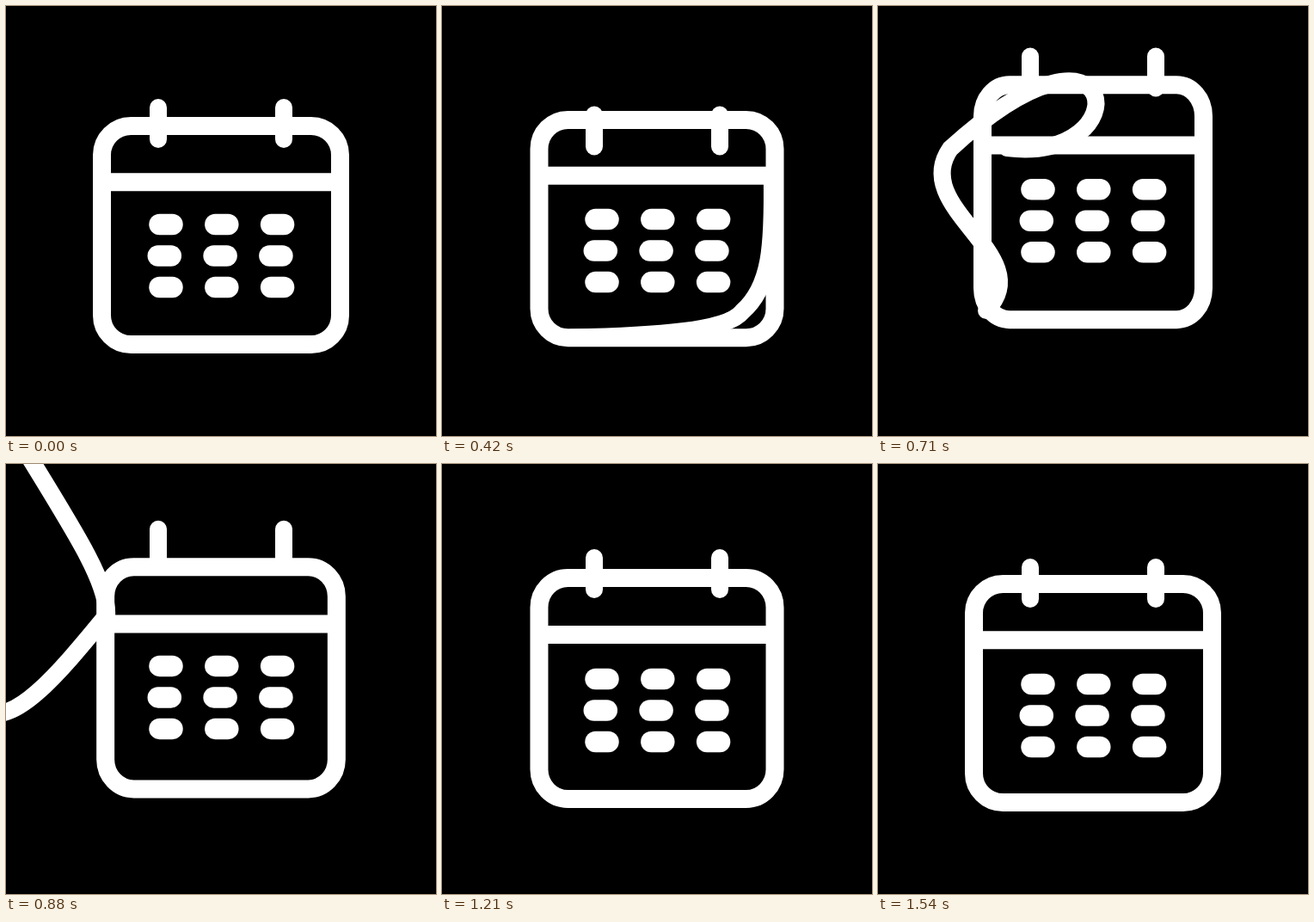
An HTML page with a canvas that plays this animation: 500x500 px, repeating every 1830 ms.

```html
<!DOCTYPE html>
<html lang="en">
<head>
<meta charset="utf-8">
<title>Calendar</title>
<style>
  html, body { margin: 0; height: 100%; overflow: hidden; background: #000; }
  canvas { display: block; width: 100vmin; height: 100vmin; }
</style>
</head>
<body>
<canvas id="stage" width="500" height="500"></canvas>
<script>
const ctx = document.getElementById('stage').getContext('2d');
const LOOP = 1830, FPS = 24;
const PEEL = 6, FOLD = 17, THROW = 21;

// The hop: crouch, leap, land, rebound, settle
const poses = [
  { at: 0, top: 129, bottom: 404, pin: 108, dots: 254 },
  { at: PEEL, top: 137, bottom: 404, pin: 130, dots: 261 },
  { at: 17.5, top: 81, bottom: 375, pin: 45, dots: 213 },
  { at: 25, top: 144, bottom: 405, pin: 128, dots: 262 },
  { at: 29, top: 122, bottom: 400, pin: 94, dots: 250 },
  { at: 36, top: 129, bottom: 404, pin: 110, dots: 256 }
];

// Two cubic curves: side edge, loose corner (fourth point), lower edge
const folded = [[150, 165], [305, 185], [288, -20], [84, 166], [36, 235], [188, 290], [126, 354]];
const thrown = [[117, 178], [121, 130], [60, 50], [-60, -150], [-100, 440], [5, 312], [117, 176]];

const mix = (a, b, u) => a + (b - a) * u;
const clamp01 = u => Math.max(0, Math.min(1, u));

function track(name, step) {
  const i = Math.max(1, poses.findIndex(pose => pose.at > step));
  if (step >= poses.at(-1).at) return poses.at(-1)[name];
  const a = poses[i - 1], b = poses[i];
  const u = clamp01((step - a.at) / (b.at - a.at));
  return mix(a[name], b[name], (1 - Math.cos(Math.PI * u)) / 2);
}

function bodyAt(step) {
  const top = track('top', step), bottom = track('bottom', step);
  const lift = 129 - top;
  return {
    top, bottom,
    left: 101 + lift * (lift > 0 ? 0.21 : 0.62),
    header: mix(top, bottom, 0.275),
    pin: track('pin', step - 1),
    dots: track('dots', step)
  };
}

function line(x1, y1, x2, y2, width) {
  ctx.lineWidth = width;
  ctx.beginPath();
  ctx.moveTo(x1, y1);
  ctx.lineTo(x2, y2);
  ctx.stroke();
}

function drawCalendar({ left, top, bottom, header, pin, dots }) {
  const width = 479 - 2 * left, height = bottom - top - 21;
  ctx.lineWidth = 21;
  ctx.beginPath();
  ctx.roundRect(left + 10.5, top + 10.5, width, height, { x: width * 0.122, y: height * 0.133 });
  ctx.stroke();
  line(left + 18, header, 482 - left, header, 21);
  for (const x of [177, 323]) line(x, pin + 10, x, pin + 47, 20);
  for (let row = 0; row < 3; row++) {
    for (let col = 0; col < 3; col++) {
      const x = 178.5 + col * 64.8 - (row === 1 ? 1.7 : 0);
      const y = dots + row * 36.5;
      line(x, y, x + 15, y, 24.5);
    }
  }
}

function drawPage(step, { left, bottom, header }) {
  const right = 490 - left, base = bottom - 10;
  const flat = [
    [right, header], [right, mix(header, base, 0.45)], [right, base - 40],
    [right - 10, base - 10],
    [right - 40, base], [250, base], [150, base]
  ];
  const peel = clamp01((step - PEEL) / (FOLD - PEEL));
  const fling = clamp01((step - FOLD) / (THROW - FOLD));
  const slide = 34 * Math.max(0, step - THROW);
  // The loose corner leads, the rest of the page follows
  const [start, c1, c2, corner, c3, c4, end] = flat.map((point, i) => {
    const bend = peel ** (2.3 + 0.6 * Math.abs(i - 3));
    return point.map((v, axis) =>
      mix(mix(v, folded[i][axis], bend), thrown[i][axis], fling) - (axis ? 0 : slide));
  });
  ctx.lineWidth = 20;
  ctx.beginPath();
  ctx.moveTo(...start);
  ctx.bezierCurveTo(...c1, ...c2, ...corner);
  ctx.bezierCurveTo(...c3, ...c4, ...end);
  ctx.stroke();
}

function draw() {
  const time = performance.now() % LOOP;
  const step = Math.floor(time * FPS / 1000 + 0.1);
  const body = bodyAt(step);
  ctx.fillStyle = '#000';
  ctx.fillRect(0, 0, 500, 500);
  ctx.strokeStyle = '#fff';
  ctx.lineCap = ctx.lineJoin = 'round';
  drawCalendar(body);
  if (step > PEEL) drawPage(step, body);
  requestAnimationFrame(draw);
}
draw();
</script>
</body>
</html>
```
